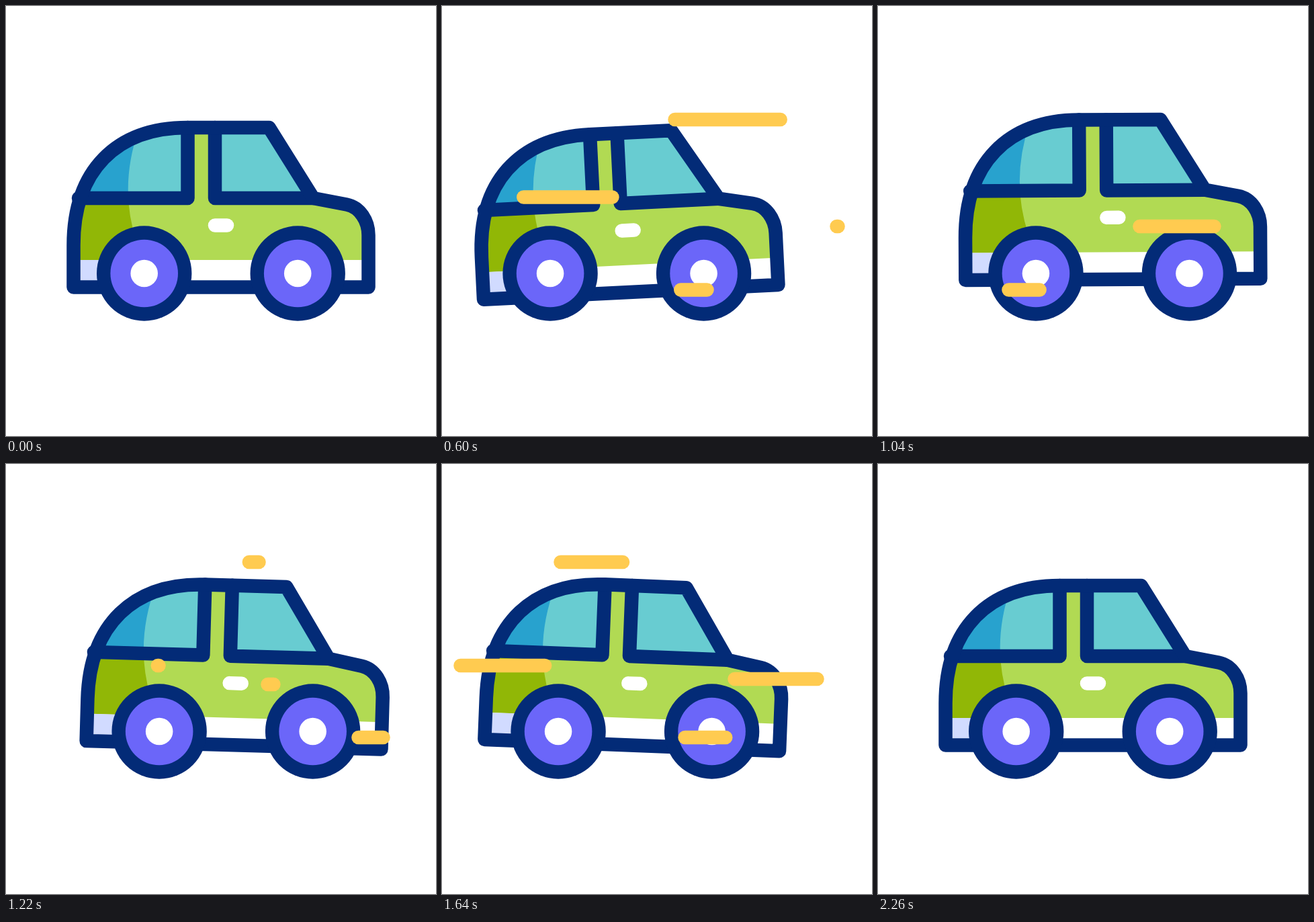
Recreate the animation shown at these times as an HTML page with a canvas. Size 640x640 px, loop 2420 ms.

```html
<!DOCTYPE html>
<html lang="en">
<head>
<meta charset="utf-8">
<title>Car</title>
<style>
  html, body { margin: 0; width: 100%; height: 100%; overflow: hidden; background: #fff; }
  canvas { display: block; width: 100vw; height: 100vh; }
</style>
</head>
<body>
<canvas id="stage" width="640" height="640"></canvas>
<script>
const ctx = document.getElementById('stage').getContext('2d');
const LOOP = 2420;
const STROKE = 20.5;
const COLOR = {
  navy: '#032b77', green: '#b1da53', darkGreen: '#91b706', teal: '#68ccd1',
  blue: '#28a2ce', lavender: '#d1dbff', purple: '#6b66f9', yellow: '#ffcb50', white: '#fff'
};

// Keyframes as [time, value]
const carX = [[0, 0], [580, -45], [1100, 32], [1600, -33], [2260, 0]];
const bodyY = [[0, 0], [490, 11], [960, -13.5], [1420, 8.8], [1860, -8.2], [2260, 0]];
const bodyTilt = [[0, 0], [680, -2.95], [1430, 2.7], [2250, 0]];

// Wind streaks run leftwards from x; the tail follows the head after a delay
const STREAK = { length: 200, duration: 440, delay: 262 };
const streaks = [
  { x: 529.5, y: 169, start: 240 },
  { x: 253.5, y: 284.5, start: 333 },
  { x: 394.5, y: 422.5, start: 476 },
  { x: 589.5, y: 328, start: 575 },
  { x: 561.5, y: 407, start: 1100 },
  { x: 376.5, y: 146, start: 1148 },
  { x: 227.5, y: 300, start: 1197 },
  { x: 558.5, y: 320, start: 1387 }
];

const outline = new Path2D(
  'M100.5 418.5V356C100.5 245 164 181 270 181H391.6L457.3 286' +
  'L507 295.5C527 299.5 539.5 320 539.5 341V418.5Z');
const windowFrames = new Path2D('M108 286H270.5V181M311 181V286H457.3');
const shade = new Path2D('M197 185Q168 270 194 350V430H80V170H197Z');

const ease = p => {
  const c = Math.min(1, Math.max(0, p));
  return c * c * (3 - 2 * c);
};

function valueAt(keys, t) {
  const i = keys.findIndex(([time]) => time > t);
  if (i < 0) return keys[keys.length - 1][1];
  const [t0, v0] = keys[i - 1], [t1, v1] = keys[i];
  return v0 + (v1 - v0) * ease((t - t0) / (t1 - t0));
}

function rect(color, x, y, w, h) {
  ctx.fillStyle = color;
  ctx.fillRect(x, y, w, h);
}

function disc(color, x, y, r) {
  ctx.fillStyle = color;
  ctx.beginPath();
  ctx.arc(x, y, r, 0, 2 * Math.PI);
  ctx.fill();
}

function pill(color, x0, x1, y) {
  ctx.strokeStyle = color;
  ctx.beginPath();
  ctx.moveTo(x0, y);
  ctx.lineTo(x1, y);
  ctx.stroke();
}

function drawBody() {
  ctx.save();
  ctx.clip(outline);
  rect(COLOR.green, 80, 160, 480, 270);
  rect(COLOR.teal, 80, 160, 190, 126);
  rect(COLOR.teal, 311, 160, 160, 126);
  rect(COLOR.white, 80, 378, 480, 50);
  ctx.clip(shade);
  rect(COLOR.blue, 80, 160, 130, 126);
  rect(COLOR.darkGreen, 80, 286, 130, 92);
  rect(COLOR.lavender, 80, 378, 130, 50);
  ctx.restore();

  ctx.strokeStyle = COLOR.navy;
  ctx.stroke(windowFrames);
  ctx.stroke(outline);
  pill(COLOR.white, 311, 329, 326.5);
}

function drawWheel(x) {
  disc(COLOR.navy, x, 398, 70.7);
  disc(COLOR.purple, x, 398, 50.3);
  disc(COLOR.white, x, 398, 20.3);
}

function drawStreak({ x, y, start }, t) {
  const head = ease((t - start) / STREAK.duration);
  const tail = ease((t - start - STREAK.delay) / STREAK.duration);
  if (head <= tail) return;
  pill(COLOR.yellow, x - STREAK.length * head, x - STREAK.length * tail, y);
}

function draw(t) {
  rect(COLOR.white, 0, 0, 640, 640);
  ctx.lineWidth = STROKE;
  ctx.lineCap = ctx.lineJoin = 'round';

  ctx.save();
  ctx.translate(valueAt(carX, t), 0);
  ctx.save();
  ctx.translate(320, 300 + valueAt(bodyY, t));
  ctx.rotate(valueAt(bodyTilt, t) * Math.PI / 180);
  ctx.translate(-320, -300);
  drawBody();
  ctx.restore();
  drawWheel(205.7);
  drawWheel(434.2);
  ctx.restore();

  streaks.forEach(s => drawStreak(s, t));
}

const begin = performance.now();
function tick() {
  draw((performance.now() - begin) % LOOP);
  requestAnimationFrame(tick);
}
tick();
</script>
</body>
</html>
```
